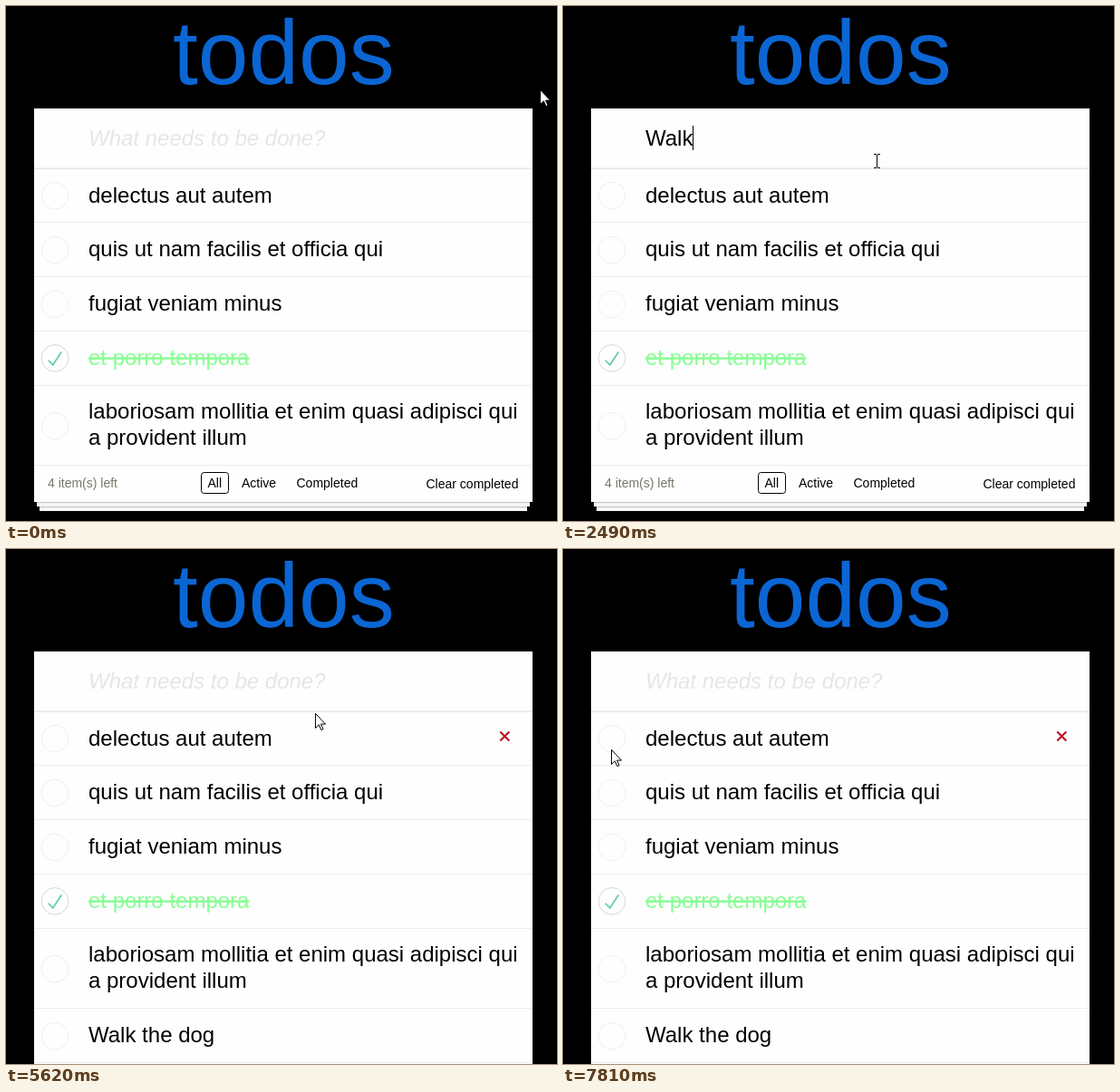
An HTML page for the animation above (8 s loop, 608 by 568 pixels).

```html
<!DOCTYPE html>
<html lang="en">
<head>
<meta charset="utf-8">
<title>todos</title>
<style>
  html, body { margin: 0; width: 100%; height: 100%; overflow: hidden; background: #000; }
  #card {
    position: absolute; left: 31px; top: 113px; width: 550px; background: #fefefe;
    box-shadow: 0 1px 1px rgba(0,0,0,.2), 0 8px 0 -3px #f6f6f6, 0 9px 1px -3px rgba(0,0,0,.2),
      0 16px 0 -6px #f6f6f6, 0 17px 2px -6px rgba(0,0,0,.2);
  }
  svg { position: absolute; left: 0; top: 0; }
  text { font: 24px "Liberation Sans", Arial, sans-serif; }
  #title { font-size: 100px; fill: #0b66d3; }
  #placeholder { font-style: italic; fill: #e6e6e6; }
  #footer text { font-size: 14px; }
  .done { fill: #88fd94; text-decoration: line-through; }
</style>
</head>
<body>
<div id="card"></div>
<svg width="608" height="568" viewBox="0 0 608 568">
  <text id="title" x="184" y="86">todos</text>
  <path d="M31 177h550v2h-550z" fill="#f7f7f7"/>
  <path d="M31 179h550v1h-550z" fill="#e4e4e4"/>
  <text id="placeholder" x="91" y="154">What needs to be done?</text>
  <text id="typed" x="91" y="154" xml:space="preserve"></text>
  <rect id="caret" y="132" width="1" height="27"/>
  <g id="list"></g>
  <g id="footer">
    <text x="46" y="531" fill="#77776a">4 item(s) left</text>
    <rect x="215.5" y="514.5" width="30" height="23" rx="3" fill="none" stroke="#000"/>
    <text x="222.5" y="531">All</text>
    <text x="260" y="531">Active</text>
    <text x="320.5" y="531">Completed</text>
    <text x="463.5" y="532">Clear completed</text>
  </g>
  <path id="cross" d="M545.3-7.5l10 10m0-10l-10 10" stroke="#b8152c" stroke-width="2.2" fill="none"/>
  <path id="arrow" d="M.5.5v16l3.8-3.7 2.5 5.8 2.2-.9-2.5-5.6h5z" fill="#fff" stroke="#000"/>
  <path id="beam" d="M-3-7.5h3m1 0h3M.5-7v14M-3 7.5h3m1 0h3" stroke="#000" fill="none"/>
</svg>
<script>
const LOOP = 8000, STEP = 70, BLINK = 530, CLICK = 750, ENTER = 4500;
const NEW_TODO = 'Walk the dog';
const keyTimes = [1620, 1890, 2090, 2490, 2690, 3090, 3180, 3270, 3360, 3560, 3760, 3960];

// bottom: y of the separator, mid: centre of the toggle
const rows = [
  { bottom: 238, mid: 209.2, lines: ['delectus aut autem'] },
  { bottom: 298, mid: 269, lines: ['quis ut nam facilis et officia qui'] },
  { bottom: 358, mid: 329, lines: ['fugiat veniam minus'] },
  { bottom: 418, mid: 388.4, lines: ['et porro tempora'], done: true },
  { bottom: 506, mid: 463.2, lines: ['laboriosam mollitia et enim quasi adipisci qui', 'a provident illum'] },
  { bottom: 566, mid: 537.2, lines: [NEW_TODO] }
];

// time, x, y and whether the move towards the next point is eased
const mousePath = [
  [180, 589, 92], [880, 383, 149], [1020, 346, 170], [1090, 346, 171],
  [5420, 346, 171], [5690, 336, 191], [5950, 336, 191], [6300, 316, 203, true],
  [6720, 282, 401], [6980, 282, 401, true], [7810, 53, 221]
];

const $ = id => document.getElementById(id);
const show = (id, on) => { $(id).style.display = on ? '' : 'none'; };
const place = (id, x, y) => $(id).setAttribute('transform', `translate(${x} ${y})`);

function rowMarkup({ bottom, mid, lines, done }) {
  const texts = lines.map((line, i) => {
    const y = bottom - 21 - (lines.length - 1 - i) * 29 - (bottom > 238 ? 1 : 0);
    return `<text x="91" y="${y}" class="${done ? 'done' : ''}">${line}</text>`;
  }).join('');
  const check = done
    ? '<path d="M72 25L42 71 27 56l-4 4 20 20 34-52z" fill="#62cfa9"/>' : '';
  return `<g><path d="M31 ${bottom}h550v1h-550z" fill="#ededed"/>
    <g transform="translate(54 ${mid}) scale(.2963) translate(-50 -50)">
      <circle cx="50" cy="50" r="50" fill="none" stroke="${done ? '#cbd3d0' : '#ededed'}" stroke-width="3"/>
      ${check}</g>${texts}</g>`;
}

function mouseAt(t) {
  const i = mousePath.findLastIndex(p => p[0] <= t);
  if (i < 0) return mousePath[0].slice(1);
  const [t0, x0, y0, eased] = mousePath[i];
  const [t1, x1, y1] = mousePath[i + 1] || [LOOP, x0, y0];
  let u = Math.floor((t - t0) / STEP) * STEP / (t1 - t0);
  if (eased) u = u * u * (3 - 2 * u);
  return [Math.round(x0 + (x1 - x0) * u), Math.round(y0 + (y1 - y0) * u)];
}

function caretVisible(t) {
  if (t < keyTimes[0]) return t >= CLICK && t < CLICK + BLINK + 10;
  return t < ENTER || (t - ENTER) % (2 * BLINK) >= BLINK;
}

function draw(t) {
  const added = t >= ENTER;
  const typed = added ? '' : NEW_TODO.slice(0, keyTimes.filter(k => k <= t).length);
  $('typed').textContent = typed;
  show('placeholder', !typed);
  show('caret', caretVisible(t));
  $('caret').setAttribute('x', 91 + Math.floor(typed ? $('typed').getComputedTextLength() : 0));

  $('list').lastElementChild.style.display = added ? '' : 'none';
  place('footer', 0, added ? 60 : 0);
  $('card').style.height = (added ? 494 : 434) + 'px';

  const [x, y] = mouseAt(t);
  const inCard = x >= 31 && x < 581;
  const overInput = inCard && y >= 113 && y < 180;
  show('beam', overInput);
  show('arrow', !overInput);
  place(overInput ? 'beam' : 'arrow', x, y);

  const hovered = inCard && y >= 180 && rows.find(r => y <= r.bottom);
  show('cross', hovered);
  if (hovered) place('cross', 0, Math.round(hovered.mid));
}

$('list').innerHTML = rows.map(rowMarkup).join('');
const start = performance.now();
function tick() {
  draw((performance.now() - start) % LOOP);
  requestAnimationFrame(tick);
}
tick();
</script>
</body>
</html>
```
